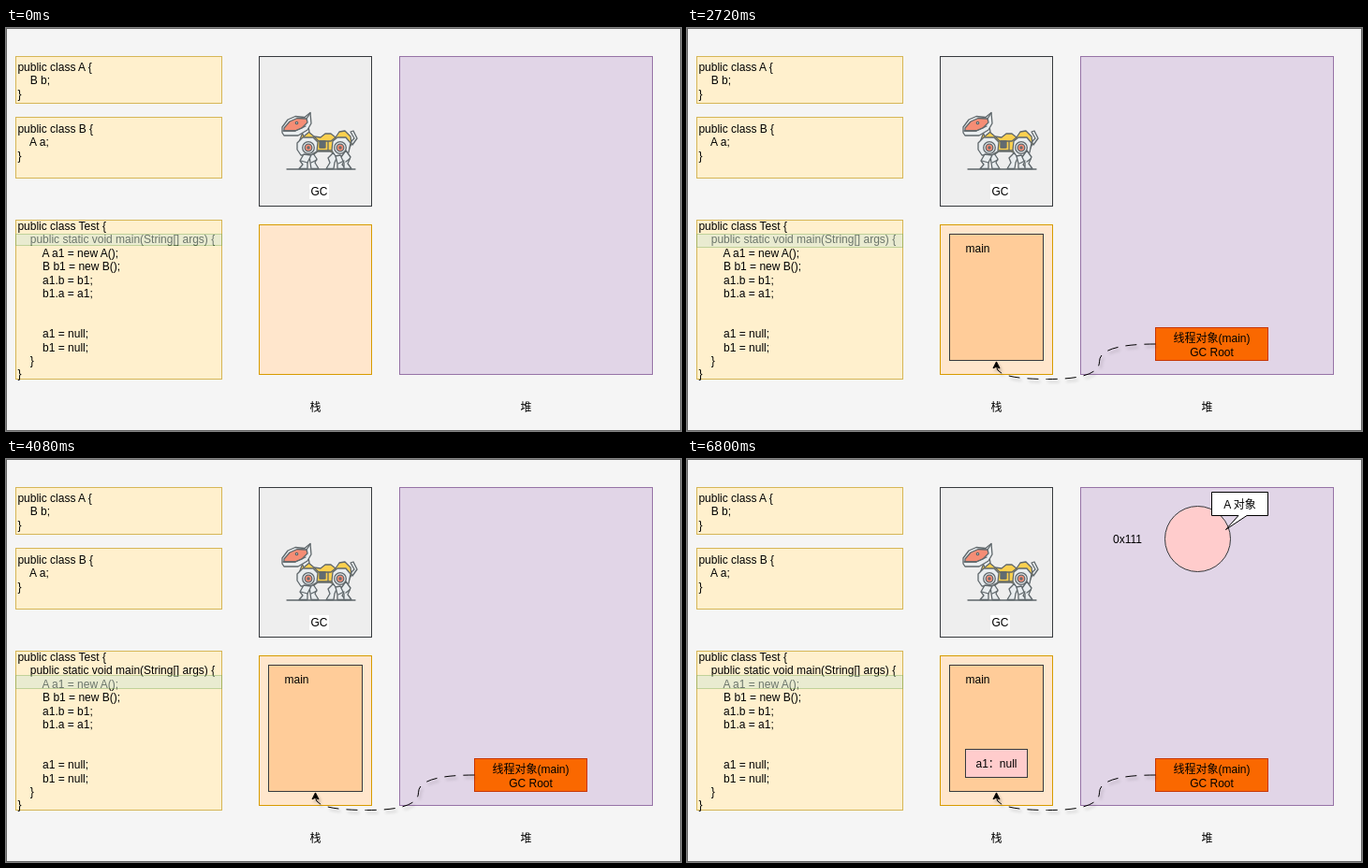
An HTML page for the animation above (8 s loop, 721 by 431 pixels).

```html
<!DOCTYPE html>
<html lang="zh">
<head>
<meta charset="utf-8">
<style>
html, body { margin: 0; width: 100%; height: 100%; overflow: hidden; background: #f5f5f5; }
svg { display: block; }
text { font: 12px "Liberation Sans", "Noto Sans CJK SC", "Noto Sans CJK", sans-serif; white-space: pre; }
.mid { text-anchor: middle; }
.code { fill: #fff0cd; stroke: #d6b656; }
.ink { stroke: #36393d; }
.dog { stroke: #5f676b; stroke-width: 1.3; stroke-linejoin: round; stroke-linecap: round; fill: #e9edef; }
.dog .y { fill: #fbd04f; }
.dog .r { fill: #f58d75; }
.dog .n { fill: none; }
</style>
</head>
<body>
<svg id="stage" width="721" height="431" viewBox="0 0 721 431">
  <defs>
    <filter id="soft" x="-10%" y="-50%" width="120%" height="220%">
      <feDropShadow dx="2" dy="3" stdDeviation="1.7" flood-color="#000" flood-opacity=".25"/>
    </filter>
  </defs>
  <rect x=".5" y=".5" width="720" height="430" fill="#f5f5f5" stroke="#666"/>
  <rect class="code" x="10.5" y="30.5" width="220" height="50"/>
  <rect class="code" x="10.5" y="95.5" width="220" height="65"/>
  <rect class="code" x="10.5" y="205.5" width="220" height="170"/>
  <g id="code"></g>
  <rect id="bar" x="10.5" width="220" fill="#d5e8d4" stroke="#82b366" opacity=".5"/>

  <rect class="ink" x="270.5" y="30.5" width="120" height="160" fill="#eee"/>
  <rect x="270.5" y="210.5" width="120" height="160" fill="#ffe6cc" stroke="#d79b00"/>
  <rect x="420.5" y="30.5" width="270" height="340" fill="#e1d5e7" stroke="#9673a6"/>
  <rect x="324" y="167" width="21" height="16" fill="#fff"/>
  <text class="mid" x="334.5" y="179">GC</text>
  <text class="mid" x="330.5" y="410">栈</text>
  <text class="mid" x="555.5" y="410">堆</text>

  <g class="dog">
    <path class="n" d="M300 151H373"/>
    <!-- far legs -->
    <path d="M328 134L332 140 330 144 334 150.5H326L325 144 324 136Z"/>
    <path d="M349 134L344 139 346 144 342 150.5H350L351 144 354 137Z"/>
    <!-- tail -->
    <path d="M368 122L372 118 368 111 371 110 375 118 370 125Z"/>
    <!-- torso -->
    <path class="y" d="M316 114L322 110 329 116 336 117 341 113H347L352 117 356 111 362 110 368 116 369 124 364 134H350L346 132H333L329 135 317 134 312 125Z"/>
    <path d="M311 123L317 117H328L333 122 332 132 325 136H315L311 130Z"/>
    <path d="M349 121L354 117H363L368 123 366 133 359 137H352L348 131Z"/>
    <path class="n" d="M329 116L334 121H347L352 117M333 131H348M344 121V131"/>
    <path d="M335 121H341V128H335Z" fill="#68757c"/>
    <path class="n" d="M337 122V128M339 122V128"/>
    <!-- near legs -->
    <path d="M318 135L314 142 317 146 313 150.5H322L322 144 326 136Z"/>
    <path d="M357 136L362 141 359 146 363 150.5H354L354 145 352 137Z"/>
    <path d="M363 131L368 138 365 145 369 150.5H361L361 144 358 138Z"/>
    <path class="n" d="M315 142L322 144M355 145L361 142M363 143L367 140M326 144L332 141"/>
    <!-- joints -->
    <circle cx="323" cy="128" r="6.3"/><circle class="r" cx="323" cy="128" r="3.8"/>
    <circle cx="357" cy="128" r="6.3"/><circle class="r" cx="357" cy="128" r="3.8"/>
    <circle cx="323" cy="128" r="1"/><circle cx="357" cy="128" r="1"/>
    <!-- neck and head -->
    <path d="M315 109L318 116 324 111 323 105Z"/>
    <path d="M295 106L301 98 309 94.5 319 95.5 325 90.5 326 102 322 109 312 115H297L295 112Z"/>
    <path class="r" d="M297 107L303 100 311 96.5 321 97 322 101 316 107 309 110H297Z"/>
    <path class="n" d="M296 110H309L320 105M321 97L325 91"/>
    <circle cx="310.5" cy="101.5" r="1.2"/>
  </g>

  <g data-from="1360">
    <rect class="ink" x="280.5" y="220.5" width="100" height="135" fill="#fc9"/>
    <text class="mid" x="310.5" y="240">main</text>
  </g>
  <g data-from="2720">
    <rect x="500.5" y="320.5" width="120" height="35" fill="#fa6800" stroke="#c73500"/>
    <text class="mid" x="560.5" y="336">线程对象(main)</text>
    <text class="mid" x="560.5" y="351">GC Root</text>
    <g filter="url(#soft)" stroke="#000">
      <path d="M500.5 338Q440.5 338 440.5 356.8T385.5 375.5Q330.5 375.5 330.5 362" fill="none" stroke-dasharray="12 8"/>
      <path d="M330.5 356.9L334 363.9 330.5 362.1 327 363.9Z"/>
    </g>
  </g>
  <g data-from="5440">
    <rect class="ink" x="297.5" y="310.5" width="66" height="30" fill="#fcc"/>
    <text class="mid" x="330.5" y="330">a1：null</text>
  </g>
  <g data-from="6800">
    <circle class="ink" cx="545.5" cy="85.5" r="35" fill="#fcc"/>
    <path d="M560.5 35.5H620.5V60.5H598L575.5 75.5 589 60.5H560.5Z" fill="#fff" stroke="#000"/>
    <text class="mid" x="590.5" y="53">A 对象</text>
    <text class="mid" x="470.5" y="90">0x111</text>
  </g>
</svg>
<script>
const LOOP = 8000;
const $ = id => document.getElementById(id);
const steps = [...document.querySelectorAll('[data-from]')];

function listing(y, lines) {
  lines.forEach((line, i) => {
    const t = document.createElementNS('http://www.w3.org/2000/svg', 'text');
    t.setAttribute('x', 12.4);
    t.setAttribute('y', Math.round(y + i * 14.4));
    t.textContent = line;
    $('code').append(t);
  });
}
listing(46, ['public class A {', '    B b;', '}']);
listing(112, ['public class B {', '    A a;', '}']);
listing(216, [
  'public class Test {',
  '    public static void main(String[] args) {',
  '        A a1 = new A();',
  '        B b1 = new B();',
  '        a1.b = b1;',
  '        b1.a = a1;',
  '', '',
  '        a1 = null;',
  '        b1 = null;',
  '    }',
  '}'
]);

function draw(t) {
  for (const g of steps) g.style.display = t >= +g.dataset.from ? '' : 'none';
  $('bar').setAttribute('y', t < 4080 ? 220.5 : 231.5);
  $('bar').setAttribute('height', t < 1360 ? 12 : 14);
}

const start = performance.now();
function tick() {
  draw((performance.now() - start) % LOOP);
  requestAnimationFrame(tick);
}
tick();
</script>
</body>
</html>
```
